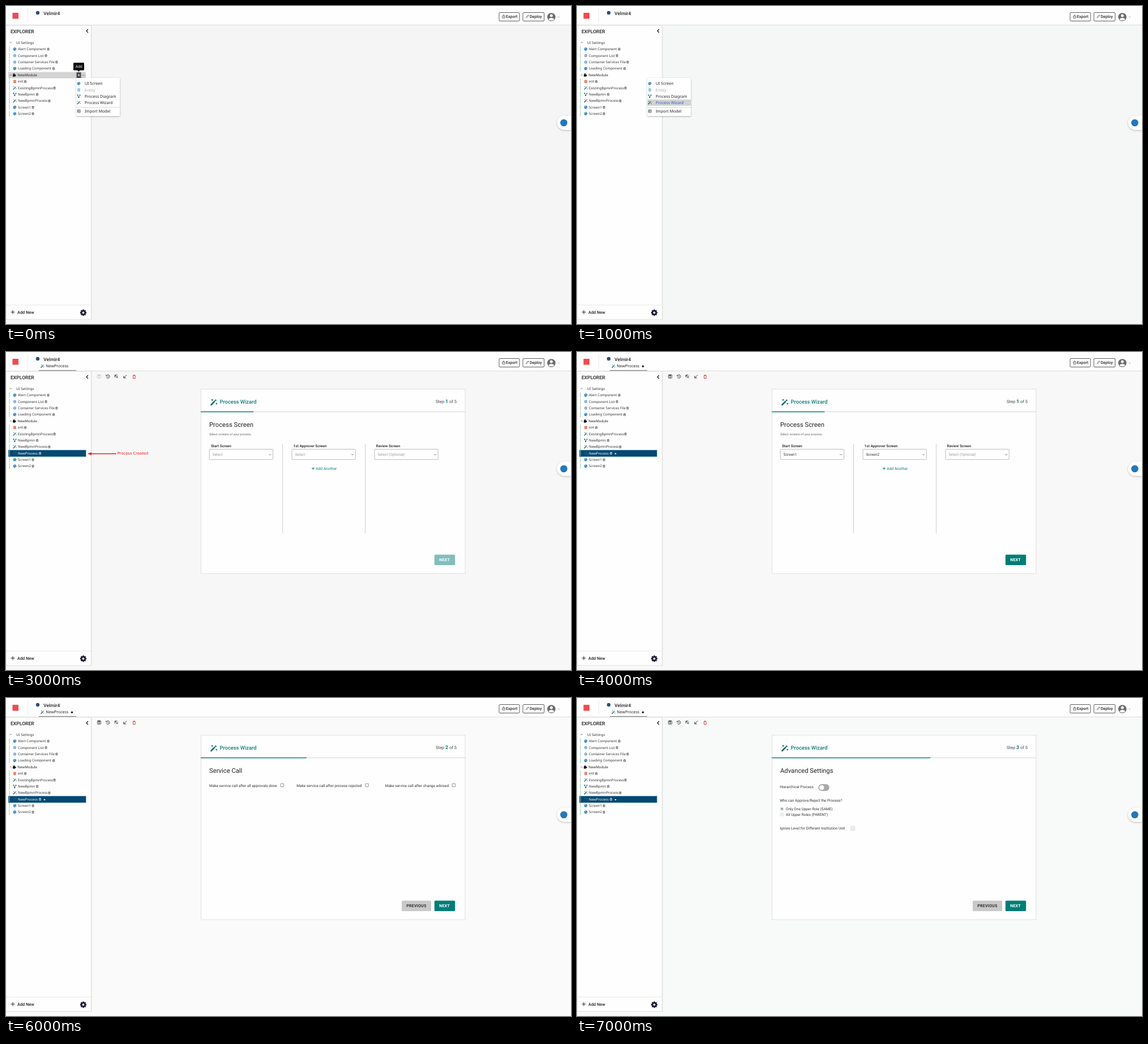
Write an HTML page that moves like this. It is 998x561 px and loops after 8000 ms.

```html
<!DOCTYPE html>
<html lang="en">
<head>
<meta charset="utf-8">
<title>Process wizard</title>
<style>
html, body { margin: 0; width: 100%; height: 100%; overflow: hidden; background: #f6f6f6; }
svg { display: block; width: 100vw; height: 100vh; }
text { text-rendering: geometricPrecision; white-space: pre; }
.r { font-family: Roboto, sans-serif; }
.n { font-family: "Noto Sans", sans-serif; }
.d { font-family: "DejaVu Sans", sans-serif; }
</style>
</head>
<body>
<svg id="stage" viewBox="0 0 998 561" xmlns="http://www.w3.org/2000/svg">
  <defs>
    <filter id="soft" x="-20%" y="-20%" width="140%" height="140%">
      <feDropShadow dx="0" dy="1" stdDeviation="1.5" flood-color="#000" flood-opacity=".3"/>
    </filter>
  </defs>
</svg>
<script>
const LOOP = 8000;
const TEAL = '#087d79', INK = '#222';
const stage = document.getElementById('stage');

// Drawing helpers, each returns markup
const text = (x, y, s, size, fill = INK, font = 'r', weight = 400, extra = '') =>
  `<text x="${x}" y="${y}" class="${font}" font-size="${size}" font-weight="${weight}" fill="${fill}" ${extra}>${s}</text>`;
const rect = (x, y, w, h, fill, extra = '') =>
  `<rect x="${x}" y="${y}" width="${w}" height="${h}" fill="${fill}" ${extra}/>`;
const line = (x1, y1, x2, y2, color, w = 1) =>
  `<path d="M${x1} ${y1}L${x2} ${y2}" stroke="${color}" stroke-width="${w}" fill="none"/>`;
const dot = (x, y, r, fill, extra = '') =>
  `<circle cx="${x}" cy="${y}" r="${r}" fill="${fill}" ${extra}/>`;
const path = (d, color, w = 1, fill = 'none') =>
  `<path d="${d}" stroke="${color}" stroke-width="${w}" fill="${fill}"/>`;
const at = (x, y, s, k = 1) => `<g transform="translate(${x} ${y}) scale(${k})">${s}</g>`;
const outline = (x, y, w, h, color, r = 1, fill = '#fff') =>
  rect(x, y, w, h, fill, `rx="${r}" stroke="${color}" stroke-width=".8"`);

// Icons are centred on 0,0
const wandIcon = (stick, spark) =>
  path('M-2.8 2.8L1 -1', stick, 1.3) + path('M1.2 -1.2L2.2 -2.2', spark, 1.3) +
  path('M-1.5 -3v1.8M-2.4 -2.1h1.8M2.5 .6v1.6M1.7 1.4h1.6', spark, .6);
const cylinder = c =>
  rect(-2.4, -2.8, 4.8, 5.6, c, 'rx="1.2"') + line(-2, -1, 2, -1, '#fff', .5) + line(-2, 1, 2, 1, '#fff', .5);
const icons = {
  palette: dot(0, 0, 2.8, '#2f86c5') + dot(-1.2, -.7, .5, '#fff') + dot(.3, -1.4, .5, '#fff') +
    dot(1.4, 1.2, .8, '#d5e8f5'),
  gear: dot(0, 0, 2, '#cfe0f0', 'stroke="#7fa4cb" stroke-width="1.3"') + dot(0, 0, .7, '#6d94bd'),
  entity: cylinder('#d9684c'),
  entityOff: cylinder('#7fb9cf'),
  wand: wandIcon('#24506a', '#21867f'),
  flow: path('M-1.9 -1.9L-.2 2L2 -1.6', '#1d6b69', .8) + dot(-2, -2, 1.1, '#1d7a75') +
    dot(2, -1.8, 1.1, '#1d7a75') + dot(-.2, 2, 1.1, '#24506a'),
  module: rect(-2.4, -1.4, 4.2, 4.2, '#111') + dot(-.3, -2, 1.1, '#111') + dot(2.2, .6, 1.1, '#111'),
  importBox: outline(-2.3, -2.3, 4.8, 4.8, '#333', .4) + path('M-2.6 0H1M-.3 -1.3L1 0L-.3 1.3', '#333', .7),
  bin: path('M-2.3 -2H2.3M-.9 -3h1.8', '#e23b4a', 1) + path('M-1.8 -1.4V3H1.8V-1.4', '#e23b4a', 1),
  clock: path('M-2.7 -1.6A3.1 3.1 0 1 1 -2.9 1.2M-3.3 -2.8V-.9H-1.4M0 -1.7V.3L1.4 1.1', '#222', .8),
  corner: path('M-2.6 1.5V-2.5H1.6M-2.4 -2.3L2.6 2.8M-.5 2.5L2.8 -.8', '#222', .9),
  slant: path('M2.8 -2.8L-2.4 2.4M-2.6 -1.2V2.6H1.2', '#222', .9)
};
const icon = (name, x, y, k = 1) => at(x, y, icons[name], k);
const saveIcon = c => outline(-3, -3, 6, 6, c, .7) + rect(-1.8, -3, 3.4, 2, c) + dot(0, 1, 1.1, c);
const link = (x, y, c) => at(x, y,
  path('M-1.9 -1.3H1.9M-1.4 -1.3V1.8H1.5V-1.3M-.5 .2H.7', c, .7) + path('M-.6 -2h1.6', c, .6));

// Sidebar rows: label, icon, centre of the link mark
const top4 = [['Alert Component', 'palette', 74.5], ['Component List', 'gear', 70.5],
  ['Container Services File', 'gear', 89.3], ['Loading Component', 'palette', 84]];
const lower = [['ent', 'entity', 34], ['ExistingBpmnProcess', 'wand', 85.5], ['NewBpmn', 'flow', 55],
  ['NewBpmnProcess', 'wand', 76.3], ['Screen1', 'palette', 47.5], ['Screen2', 'palette', 47.5]];
const fresh = ['NewProcess', 'wand', 60];

function row([label, pic, mark], y, picked, dirty) {
  const c = picked ? '#fff' : '#333';
  return (picked ? rect(4.4, y - 5.3, 136.6, 11, '#074770', 'stroke="#0b5f91" stroke-width=".8"') : '') +
    line(6, y - 5, 6, y + 5, '#98cda8', 1) + icon(pic, 15.5, y + .1) +
    text(21, y + 2.2, label, 6.15, c, 'n') + link(mark, y + .2, c) +
    (picked && dirty ? dot(68, y + .8, 1.2, '#fff') : '');
}

function sidebar(s) {
  const items = s.step ? [...lower.slice(0, 4), fresh, ...lower.slice(4)] : lower;
  const chev = y => path(`M6.6 ${y + .8}L8.3 ${y - .8}L10 ${y + .8}`, '#555', .8);
  let out = rect(0, 34, 150.5, 519, '#fefefe', 'stroke="#dedede" stroke-width="1"') +
    line(151.5, 36, 151.5, 554, '#ececec') +
    text(8, 48.2, 'EXPLORER', 8.6, INK, 'r', 500) +
    path('M145 41L142 44L145 47', '#111', 1.2) +
    chev(64.5) + text(18, 66.8, 'UI Settings', 6.15, '#333', 'n');
  top4.forEach((r, i) => out += row(r, 76 + i * 11.4));
  if (s.menu === 1) out += rect(4, 116.5, 137, 11, '#d3d3d3');
  out += chev(121.8) + icon('module', 14.5, 121.8) + text(20.3, 124.1, 'NewModule', 6.15, '#222', 'n');
  items.forEach((r, i) => out += row(r, 133.1 + i * 11.36, r === fresh, s.dirty));
  out += line(0, 527.5, 150, 527.5, '#e8e8e8') +
    path('M8.5 540H15.5M12 536.5V543.5', '#222', 1) +
    text(20, 543.3, 'Add New', 7.4, INK, 'r', 500);
  let teeth = '';
  for (let a = 0; a < 360; a += 45) teeth += `<rect x="-1.3" y="-5.6" width="2.6" height="3" fill="#17172f" transform="rotate(${a})"/>`;
  return out + at(136.5, 541, teeth + dot(0, 0, 3.1, 'none', 'stroke="#17172f" stroke-width="2.4"'));
}

function header(s) {
  let out = rect(0, 0, 998, 33, '#fefefe') + line(0, 33.5, 998, 33.5, '#dcdcdc') +
    line(38.5, 4, 38.5, 29, '#ececec') +
    rect(11.5, 12, 10.5, 10.5, '#f04b50') + dot(56, 12, 3.2, '#2d5078') +
    text(66.3, 15.6, 'Velmir4', 8.4, INK, 'r', 500);
  out += outline(871, 11.5, 36, 15, '#333', 1.5) + outline(913, 11.5, 37.5, 15, '#333', 1.5) +
    at(879, 18.7, path('M-1 -1.2H-2.2V2.6H2.2V-1.2H1M0 1V-3M-1.2 -1.9L0 -3L1.2 -1.9', '#333', .7)) +
    text(883, 21, 'Export', 7, INK, 'r', 500) +
    at(920.5, 18.8, path('M-1.6 .4L1.2 -2.5L2.6 -2.7L2.4 -1.2L-.4 1.6ZM-2.5 2.5L-1.2 1.2', '#333', .7)) +
    text(925, 21, 'Deploy', 7, INK, 'r', 500);
  out += dot(963.3, 19.5, 7.3, '#6c6c6c') + dot(963.3, 17.1, 2.5, '#fff') +
    '<path d="M958.3 23.7Q959.4 21 963.3 21T968.3 23.7Q966.2 25.6 963.3 25.6T958.3 23.7Z" fill="#fff"/>' +
    path('M974.6 18.6L976.2 20.1L977.8 18.6', '#999', .8);
  if (s.step) {
    out += icon('wand', 64.3, 25) + text(70.3, 27.4, 'NewProcess', 7, '#222', 'n') +
      line(58, 32.5, 124, 32.5, '#777', 1.2) + (s.dirty ? dot(116.5, 25.2, 1.8, '#222') : '');
  }
  return out;
}

function menu(s) {
  const rows = [['UI Screen', 'palette', 136.7], ['Entity', 'entityOff', 148], ['Process Diagram', 'flow', 159.2],
    ['Process Wizard', 'wand', 170.5], ['Import Model', 'importBox', 185.4]];
  let out = rect(124.5, 127, 76.5, 67, '#fff', 'filter="url(#soft)"') + line(124.5, 178.8, 201, 178.8, '#ccc', .8);
  if (s.menu === 2) out += rect(124.5, 165, 76.5, 11, '#d2d2d2');
  rows.forEach(([label, pic, y], i) => {
    const c = i === 1 ? '#aaa' : i === 3 && s.menu === 2 ? '#2c62c4' : '#222';
    out += icon(pic, 128.6, y) + text(139, y + 2.5, label, 7, c, 'n');
  });
  if (s.menu === 1) {
    out += rect(124.5, 117, 8, 10, '#444b55') + path('M126.8 122H130.4M128.6 120.2V123.8', '#fff', .8) +
      [135, 137, 139].map(x => dot(x, 122, .6, '#555')).join('') +
      rect(119, 100, 19, 13.5, '#0c0c0c', 'rx="1.5"') + path('M126 113L128.5 116L131 113Z', 'none', 0, '#0c0c0c') +
      text(123, 109.2, 'Add', 6.5, '#fff');
  }
  return out;
}

function modal() {
  const star = x => text(x, 0, '*', 6.5, '#222', 'r', 700);
  const label = (y, s, x) => text(379.3, y, s, 6.45, '#191938', 'r', 700) + `<g transform="translate(0 ${y})">${star(x)}</g>`;
  const radio = (y, on) => dot(382.3, y, 2.6, '#fff', 'stroke="#777" stroke-width=".7"') + (on ? dot(382.3, y, 1.6, '#555') : '');
  return rect(0, 0, 998, 561, '#000', 'opacity=".5"') +
    rect(370, 170, 258, 221, '#fff', 'rx="2" filter="url(#soft)"') +
    text(379.3, 188, 'Create New Process Wizard', 9.3, INK, 'r', 500) +
    path('M613.5 182L619.5 188M619.5 182L613.5 188', '#777', 1) +
    line(370, 198.5, 628, 198.5, '#dedede') +
    label(215, 'Process Name', 425) + outline(379.5, 219.5, 238.5, 18, '#888') +
    text(381, 231.7, 'NewProcess', 7, '#444', 'n') +
    line(379.5, 246, 618, 246, '#d0d0d0') +
    radio(259, true) + text(386, 261.6, 'Create New Process Flow (BPMN)', 7, '#444', 'n') +
    label(273.3, 'Process Flow Name', 440) + outline(379.5, 277.7, 238.5, 18, '#888') +
    text(381, 289.9, 'NewProcess', 7, '#444', 'n') +
    line(381, 291.2, 421, 291.2, '#e04a4a', .8) + line(421.2, 282.3, 421.2, 291.5, '#111', .8) +
    radio(312.8, false) + text(386, 315.7, 'Choose Existing Process Flow (BPMN)', 7, '#444', 'n') +
    line(379.5, 333.5, 618, 333.5, '#dedede') +
    rect(583.7, 344, 34.8, 14.8, '#17153a', 'rx="1.5"') + text(590.8, 353.2, 'CREATE', 5.45, '#fff', 'r', 700);
}

const button = (x, w, s, tx, fill, c) => rect(x, 357.5, w, 18.5, fill, 'rx="1.5"') +
  text(tx, 369.3, s, 7.15, c, 'r', 700, 'letter-spacing=".15"');

function screens(s) {
  const cols = [[359.3, 'Start Screen', 'Select', 'Screen1'], [505, '1st Approver Screen', 'Select', 'Screen2'],
    [651, 'Review Screen', 'Select (Optional)', '']];
  return text(359, 147.4, 'Select screens of your process.', 5.4, '#666') +
    cols.map(([x, name, hint, value]) =>
      text(x + 2.6, 167.6, name, 6.5, INK, 'r', 500) + outline(x, 171.5, 112.2, 18.2, '#aaa') +
      text(x + 5.5, 183.1, s.dirty && value || hint, 6.5, s.dirty && value ? '#333' : '#999') +
      path(`M${x + 105} 180L${x + 107} 182L${x + 109} 180`, '#666', .8)).join('') +
    line(488.5, 162, 488.5, 320, '#cfcfcf') + line(634.5, 162, 634.5, 320, '#cfcfcf') +
    path('M540 205.5H545M542.5 203V208', TEAL, .9) + text(547.3, 207.8, 'Add Another', 6.65, TEAL);
}

function services() {
  return [[359, 'all approvals done', 485], [513.3, 'process rejected', 634.7], [669.7, 'change advised', 788.2]]
    .map(([x, s, box]) => text(x, 156.6, 'Make service call after ' + s, 6.54, '#333') +
      outline(box, 151, 5.6, 5.6, '#777', .8)).join('');
}

function advanced() {
  return text(358.2, 159, 'Hierarchical Process', 6.5, '#333') +
    rect(426.3, 152, 19.4, 12, '#a8a8a8', 'rx="6"') + dot(432.3, 158, 4.2, '#fff') +
    text(358.2, 183.4, 'Who can Approve/Reject the Process?', 6.5, '#333') +
    dot(362, 195.6, 3.2, '#e6e9ed', 'stroke="#d3d8de" stroke-width=".6"') + dot(362, 195.6, 1.7, '#8d929a') +
    text(369, 198, 'Only One Upper Role (SAME)', 6.5, '#333') +
    dot(362, 205.4, 3.2, '#eceff2', 'stroke="#dde1e6" stroke-width=".6"') +
    text(369, 207.9, 'All Upper Roles (PARENT)', 6.5, '#333') +
    text(358.2, 231.8, 'Ignore Level for Different Institution Unit', 6.5, '#333') +
    rect(483, 226, 8, 8, '#e9ecf0', 'rx="1" stroke="#dde1e6" stroke-width=".6"');
}

function wizard(s) {
  const titles = ['Process Screen', 'Service Call', 'Advanced Settings'];
  const ready = s.dirty;
  let out = at(164.5, 43.2, saveIcon(s.dirty ? '#222' : '#c4c4c4')) + icon('clock', 180, 43.2) +
    icon('corner', 195, 43.2) + icon('slant', 210.5, 43.2) + icon('bin', 226.3, 43.5);
  out += rect(344.5, 65.5, 466.5, 325.5, '#fefefe', 'stroke="#dfdfdf" stroke-width="1"') +
    line(344, 105.5, 811, 105.5, '#d6d6d6') + line(344, 105.5, 344 + 93.4 * s.step, 105.5, TEAL, 1.5) +
    at(367, 88.5, wandIcon('#17635f', TEAL), 1.9) +
    text(377.6, 91, 'Process Wizard', 9.3, TEAL, 'r', 500) +
    `<text x="759" y="90" class="r" font-size="7.5" fill="#444">Step <tspan font-size="8.8" font-weight="700" fill="${TEAL}">${s.step}</tspan> of 5</text>` +
    text(359, 132.4, titles[s.step - 1], 11.25, INK);
  out += [screens, services, advanced][s.step - 1](s);
  if (s.step > 1) out += button(699, 52, 'PREVIOUS', 707.3, '#c9c9c9', '#333');
  out += button(756.8, 36.4, 'NEXT', 765.2, ready ? '#007d77' : '#82bebc', '#fff');
  if (s.note) {
    out += line(149, 179.5, 195, 179.5, '#f01818', 1.3) +
      path('M144 179.5L151 177V182Z', 'none', 0, '#f01818') +
      text(196.8, 181, 'Process Created', 6.75, '#f01818', 'd');
  }
  return out;
}

const chat = () => '<path d="M998 193.5H986A12.5 12.5 0 0 0 986 218.5H998Z" fill="#fff" filter="url(#soft)"/>' +
  dot(985.3, 206, 6.3, '#2577b8');

// Screen states and the time each begins
const states = [
  { from: 0, bg: '#f5f5f5', menu: 1 },
  { from: 1000, bg: '#f5f7f6', menu: 2 },
  { from: 2000, bg: '#f5f5f5', modal: true },
  { from: 3000, bg: '#f7f7f7', step: 1, note: true },
  { from: 4000, bg: '#f8f8f8', step: 1, dirty: true },
  { from: 5000, bg: '#f9faf9', step: 2, dirty: true },
  { from: 7000, bg: '#f8f9f9', step: 3, dirty: true }
];

const layer = document.createElementNS('http://www.w3.org/2000/svg', 'g');
stage.appendChild(layer);
let shown = null;

function draw(time) {
  const t = time % LOOP;
  const s = states.filter(v => v.from <= t).pop();
  if (s === shown) return;
  shown = s;
  layer.innerHTML = rect(0, 0, 998, 561, s.bg) + header(s) + sidebar(s) +
    (s.step ? wizard(s) : '') + (s.menu ? menu(s) : '') + (s.modal ? modal() : '') + chat();
}

const start = performance.now();
function tick() {
  draw(performance.now() - start);
  requestAnimationFrame(tick);
}
tick();
</script>
</body>
</html>
```
